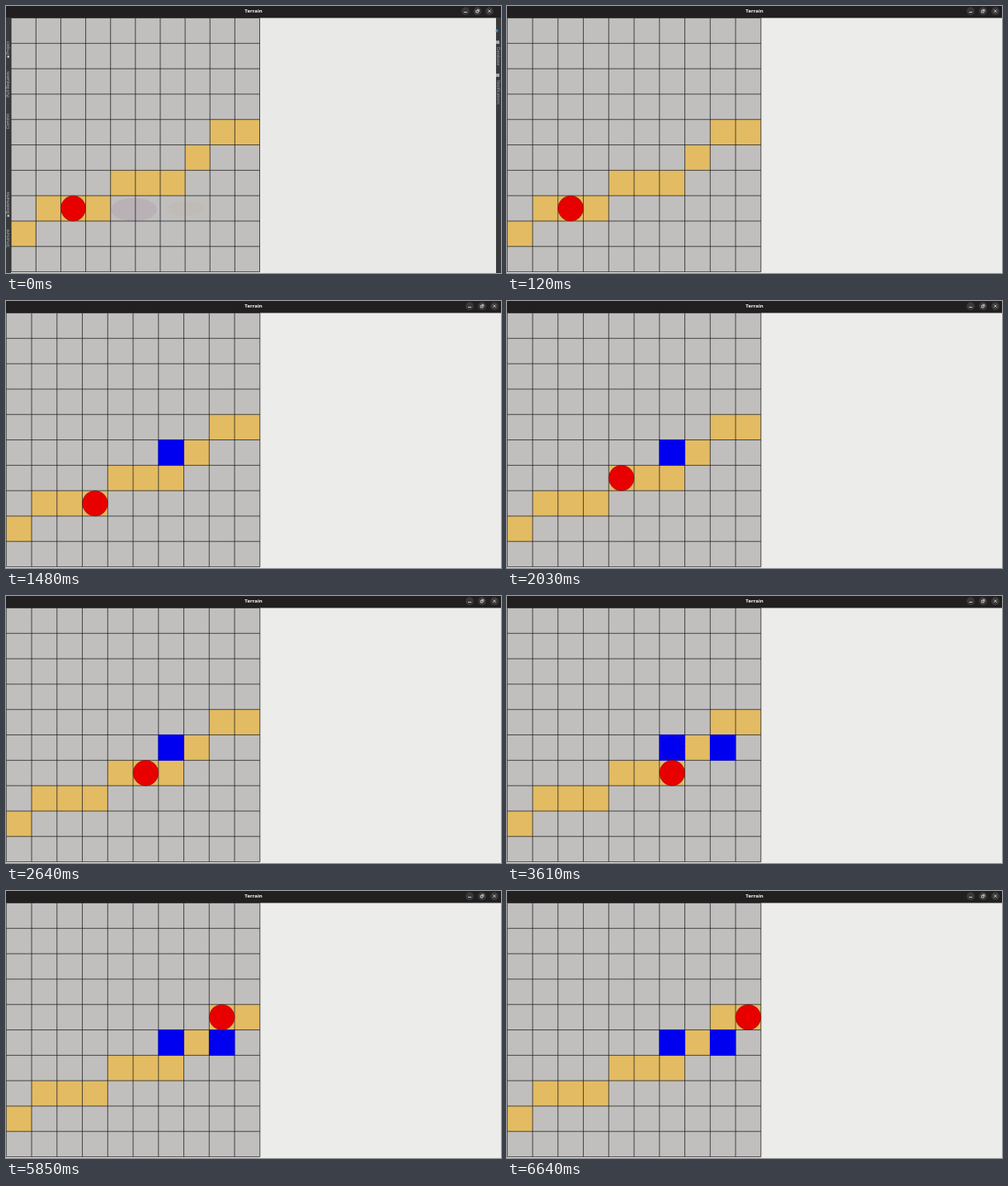
These frames come from a looping animation (600x324 px, 7.03 s). An HTML page with a canvas:

```html
<!DOCTYPE html>
<html>
<head>
<meta charset="utf-8">
<title>Terrain</title>
<style>
html, body { margin: 0; width: 100%; height: 100%; overflow: hidden; background: #ececeb; }
canvas { display: block; }
</style>
</head>
<body>
<canvas id="stage" width="600" height="324"></canvas>
<script>
const ctx = document.getElementById('stage').getContext('2d');
const LOOP = 7030, OPENED = 120;
const TOP = 14.5, ROW = 30.81;
const path = [[0, 8], [1, 7], [2, 7], [3, 7], [4, 6], [5, 6], [6, 6], [7, 5], [8, 4], [9, 4]];
const moves = [580, 1610, 2640, 3610, 4850, 5850, 6640];
const obstacles = [
  { cell: [6, 5], from: 1480, ring: 3610 },
  { cell: [8, 5], from: 2820, ring: 4850 }
];
const RING_END = 5850;

function rect(x, y, w, h, color) {
  ctx.fillStyle = color;
  ctx.fillRect(x, y, w, h);
}

function ellipse(x, y, rx, ry, color) {
  ctx.fillStyle = color;
  ctx.beginPath();
  ctx.ellipse(x, y, rx, ry, 0, 0, 7);
  ctx.fill();
}

function label(text, x, y, font, color, angle = 0) {
  ctx.save();
  ctx.translate(x, y);
  ctx.rotate(angle);
  ctx.font = font;
  ctx.fillStyle = color;
  ctx.textAlign = 'center';
  ctx.textBaseline = 'middle';
  ctx.fillText(text, 0, 0);
  ctx.restore();
}

function titleBar(buttons) {
  rect(0, 0, 600, TOP, '#211f20');
  label('Terrain', 300, 6.8, 'bold 6px "Open Sans", sans-serif', '#fff');
  buttons.forEach(x => ellipse(x, 6.2, 4.9, 4.9, '#3b393a'));
  const [min, max, close] = buttons;
  ctx.strokeStyle = '#e4e4e4';
  ctx.lineWidth = 0.8;
  ctx.beginPath();
  ctx.moveTo(min - 2, 7.5);
  ctx.lineTo(min + 2, 7.5);
  ctx.rect(max - 1.7, 5.4, 2.6, 2.6);
  ctx.moveTo(max - 0.6, 4.3);
  ctx.lineTo(max + 1.9, 4.3);
  ctx.lineTo(max + 1.9, 6.8);
  ctx.moveTo(close - 1.7, 4.5);
  ctx.lineTo(close + 1.7, 7.9);
  ctx.moveTo(close + 1.7, 4.5);
  ctx.lineTo(close - 1.7, 7.9);
  ctx.stroke();
}

// Editor side bars, visible while the window is still growing
function sideBars() {
  rect(0, 14, 6, 310, '#393a3c');
  rect(594, 14, 6, 310, '#393a3c');
  const font = '5px "Open Sans", sans-serif';
  const left = [['■ Project', 53], ['Pull Requests', 95], ['Commit', 140], ['■ Bookmarks', 241], ['Structure', 282]];
  left.forEach(([text, y]) => label(text, 2.5, y, font, '#c5c6c7', -Math.PI / 2));
  label('Database', 596, 61, font, '#b5b6b7', Math.PI / 2);
  label('Notifications', 596, 105, font, '#b5b6b7', Math.PI / 2);
  rect(594, 42, 4, 4, '#a9aaab');
  rect(594, 82, 4, 4, '#a9aaab');
  ellipse(595, 30, 1.5, 2, '#4a86c5');
}

function draw(t) {
  const opening = t < OPENED;
  const left = opening ? 6.2 : 0.3, col = opening ? 30.13 : 30.75;
  const cellX = c => left + c * col, cellY = r => TOP + r * ROW;
  const fillCell = ([c, r], color, grow = 0) =>
    rect(cellX(c) - grow, cellY(r) - grow, col + 2 * grow, ROW + 2 * grow, color);

  rect(0, 0, 600, 324, opening ? '#e9e9e7' : '#ececeb');
  titleBar(opening ? [557, 571.5, 586] : [562, 577, 592]);
  rect(left, TOP, col * 10, ROW * 10, '#c0bfbe');
  path.forEach(cell => fillCell(cell, '#e3bb62'));
  if (opening) {
    sideBars();
    ellipse(155, 247, 28, 14, 'rgba(175,150,165,.35)');
    ellipse(218, 246, 23, 9, 'rgba(190,180,150,.25)');
  }

  ctx.strokeStyle = '#1c1c1c';
  ctx.lineWidth = 0.75;
  ctx.beginPath();
  for (let i = 0; i <= 10; i++) {
    ctx.moveTo(cellX(i), TOP);
    ctx.lineTo(cellX(i), cellY(10));
    ctx.moveTo(left, cellY(i));
    ctx.lineTo(cellX(10), cellY(i));
  }
  ctx.stroke();

  const active = obstacles.filter(o => t >= o.from);
  active.forEach(o => fillCell(o.cell, '#0000f0', 0.3));

  ctx.strokeStyle = 'rgba(200,0,60,.6)';
  ctx.lineWidth = 0.8;
  ctx.setLineDash([2, 3]);
  active.filter(o => t >= o.ring && t < RING_END).forEach(({ cell: [c, r] }) => {
    ctx.beginPath();
    ctx.arc(cellX(c + 0.5), cellY(r + 0.5), 15.2, 0, 7);
    ctx.stroke();
  });
  ctx.setLineDash([]);

  const [c, r] = path[2 + moves.filter(m => t >= m).length];
  ellipse(cellX(c + 0.5), cellY(r + 0.5), col / 2, ROW / 2, '#e80000');
  ctx.strokeStyle = 'rgba(50,0,0,.5)';
  ctx.lineWidth = 0.6;
  ctx.stroke();
}

function tick() {
  draw(performance.now() % LOOP);
  requestAnimationFrame(tick);
}
tick();
</script>
</body>
</html>
```
